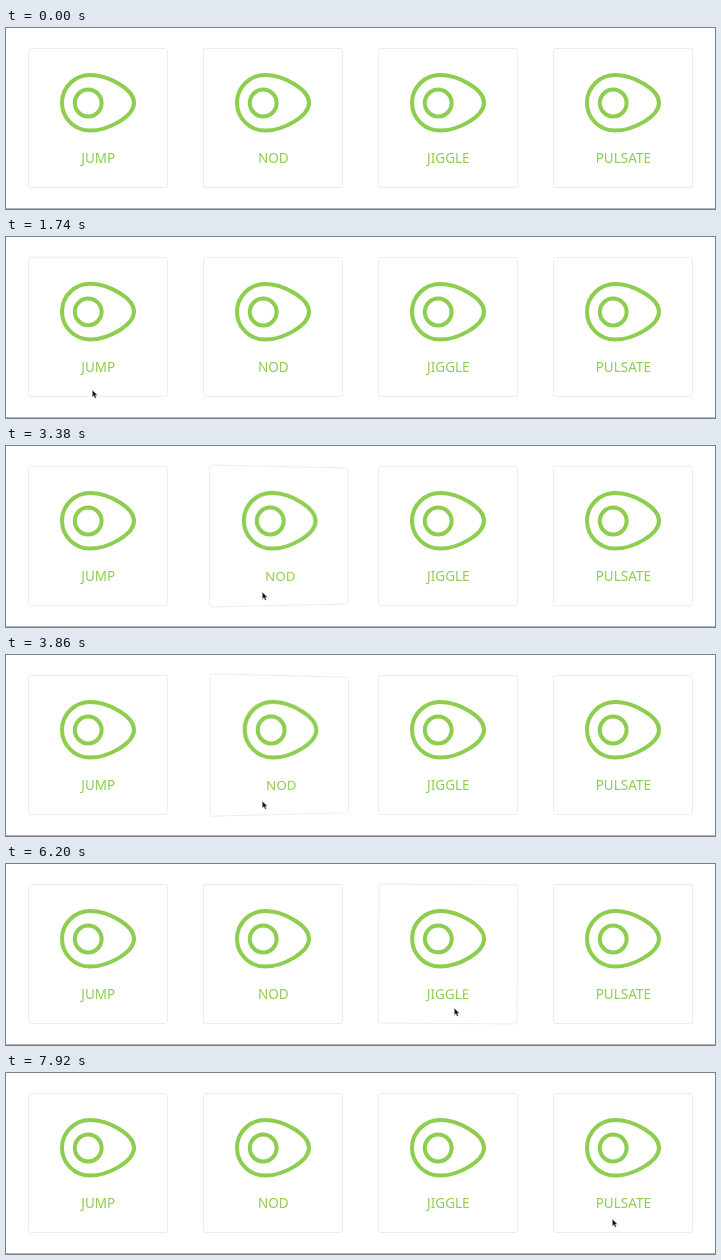
An HTML page that plays this animation: 709 by 181 pixels, repeating every 8 s.

```html
<!DOCTYPE html>
<html lang="en">
<head>
<meta charset="utf-8">
<title>Hover effects</title>
<style>
  html, body { margin: 0; width: 100%; height: 100%; overflow: hidden; background: #fff; }
  body { position: relative; }
  .card {
    position: absolute; top: 20px; width: 140px; height: 140px; box-sizing: border-box;
    border: 1px solid #ececec; border-radius: 3px;
  }
  .card svg { position: absolute; left: -1px; top: -1px; }
  .card path, .card circle { fill: none; stroke: #8dcd4f; stroke-width: 4; }
  text {
    font: 400 13.5px "Noto Sans", "Open Sans", sans-serif;
    font-stretch: extra-condensed; fill: #8dcd4f; text-anchor: middle;
  }
  #line { position: absolute; left: 0; top: 180px; width: 100%; height: 1px; background: #b4b4b4; }
  #cursor { position: absolute; left: 0; top: 0; overflow: visible; }
</style>
</head>
<body>
<div id="line"></div>
<svg id="cursor" width="7" height="10">
  <path d="M.3 0V7.2L1.9 5.7L3 8.3L4.4 7.7L3.3 5.2H5.5Z" fill="#111" stroke="#fff" stroke-width=".4"/>
</svg>
<script>
const LOOP = 8000;
const cursor = document.getElementById('cursor');

const cards = ['JUMP', 'NOD', 'JIGGLE', 'PULSATE'].map((label, i) => {
  const card = document.createElement('div');
  card.className = 'card';
  card.style.left = 22 + 175 * i + 'px';
  card.innerHTML = `<svg width="140" height="140">
    <path d="M34 54.8C34 39 47 27 62 27C80 27 106 41 106 54.8S80 82.6 62 82.6C47 82.6 34 70.6 34 54.8Z"/>
    <circle cx="60.2" cy="55" r="13.4"/>
    <text x="70.3" y="115">${label}</text></svg>`;
  cursor.before(card);
  return card;
});

const clamp = x => Math.min(1, Math.max(0, x));
const bezier = (a, b, s) => 3 * a * s * (1 - s) ** 2 + 3 * b * s * s * (1 - s) + s ** 3;

// CSS "ease": cubic-bezier(.25, .1, .25, 1)
function ease(x) {
  let lo = 0, hi = 1;
  for (let i = 0; i < 20; i++) {
    const mid = (lo + hi) / 2;
    if (bezier(.25, .25, mid) < x) lo = mid; else hi = mid;
  }
  return bezier(.1, 1, lo);
}

// 0 → 1 → -1 → 0, each leg eased
function swing(t, period, count) {
  if (t < 0 || t >= period * count) return 0;
  const p = t % period / period;
  if (p < .25) return ease(p * 4);
  if (p < .75) return 1 - 2 * ease(p * 2 - .5);
  return ease(p * 4 - 3) - 1;
}

// Eased rise and its mirror image, twice
function hop(t) {
  if (t < 0 || t >= 1000) return 0;
  const p = t % 500 / 250;
  return ease(p < 1 ? p : 2 - p);
}

// start, end, target x, target y, height of the arc
const moves = [
  [40, 600, 86, 153, 0],
  [2120, 2500, 256, 146, 0],
  [4320, 4860, 448, 144, 11],
  [7280, 7920, 606, 146, 3]
];

function pointer(t) {
  let x = -8, y = 154;
  for (const [start, end, toX, toY, arc] of moves) {
    const k = ease(clamp((t - start) / (end - start)));
    x += (toX - x) * k;
    y += (toY - y) * k - 4 * arc * k * (1 - k);
  }
  return [x, y];
}

function draw(now) {
  const t = now % LOOP;
  const nod = swing(t - 2738, 500, 3);
  const jiggle = swing(t - 5098, 250, 8);
  const [x, y] = pointer(t);
  cards[0].style.transform = `translateY(${-10 * hop(t - 750)}px)`;
  cards[1].style.transform = nod
    ? `translateX(${8 * nod}px) perspective(300px) rotateY(${6 * nod}deg)` : 'none';
  cards[2].style.transform = `rotate(${-2.9 * jiggle}deg)`;
  cursor.style.transform = `translate(${x}px, ${y}px)`;
  requestAnimationFrame(draw);
}
draw(performance.now());
</script>
</body>
</html>
```
